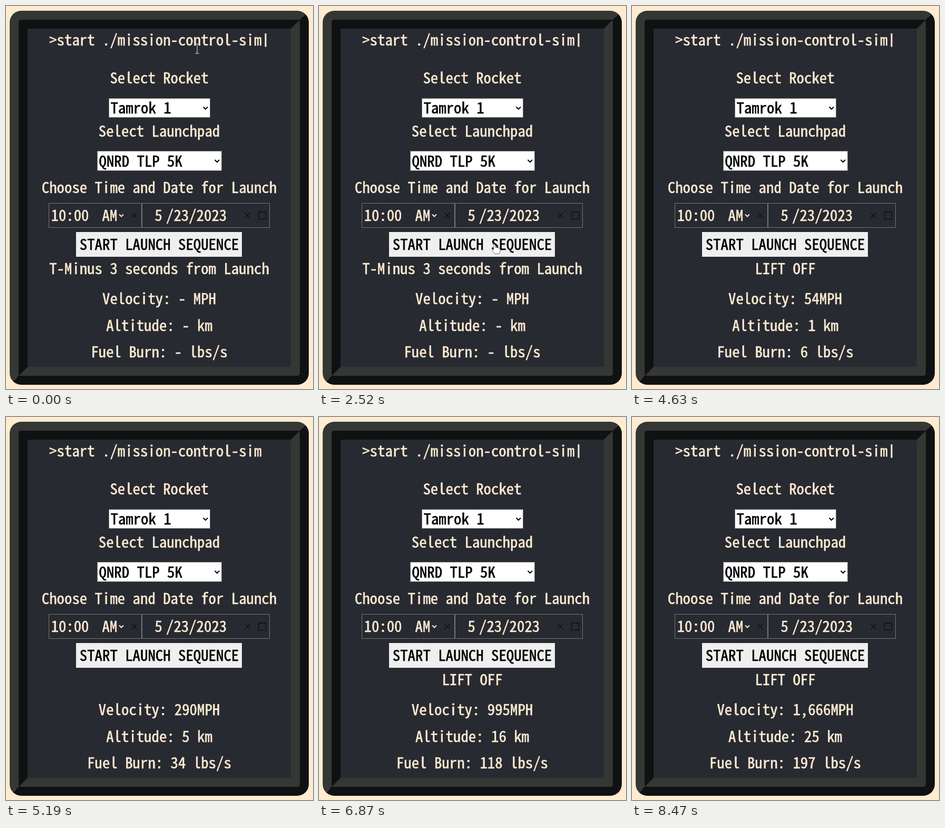
An HTML page that plays this animation: 583x727 px, repeating every 8.55 s.

```html
<!DOCTYPE html>
<html lang="en">
<head>
<meta charset="utf-8">
<title>Mission control</title>
<style>
  html, body { margin: 0; width: 100%; height: 100%; overflow: hidden; background: #feebd0; }
  .bezel, .bezel div { position: absolute; box-sizing: border-box; border: 17px solid; }
  .bezel {
    left: 7px; top: 9px; width: 568px; height: 710px; border-radius: 22px;
    border-color: #343733 #101112 #101112 #343733; background: #101112;
  }
  .bezel div {
    inset: 0; border-radius: 5px; background: #282a31;
    border-color: #101112 #343733 #343733 #101112;
  }
  svg { position: absolute; left: 0; top: 0; }
  text {
    font: 28.8px "Noto Sans Mono CJK JP", "Noto Sans Mono CJK SC", "Noto Sans Mono CJK KR", "Liberation Mono", monospace;
    fill: #fdebd2; stroke: #fdebd2; stroke-width: .6px; white-space: pre;
  }
  .mid { text-anchor: middle; }
  .ink { fill: #000; stroke: #000; }
  .field { fill: none; stroke: #767676; }
  .select { fill: #fff; }
  .line { fill: none; stroke: #000; stroke-width: 2; }
  .icon { fill: none; stroke: #111214; stroke-width: 1.6; }
</style>
</head>
<body>
<div class="bezel"><div></div></div>
<svg width="583" height="727" viewBox="0 0 583 727">
  <text id="title" x="82.2" y="75">&gt;start ./mission-control-sim</text>
  <rect id="caret" x="491.5" y="52" width="3" height="25.5" fill="#fdebd2"/>

  <text class="mid" x="291" y="147">Select Rocket</text>
  <rect class="field select" x="195.5" y="175.5" width="192" height="36"/>
  <text class="ink" x="198.5" y="204">Tamrok 1</text>
  <path class="line" d="M374.5 191.5l4.3 4.3 4.3-4.3"/>

  <text class="mid" x="291" y="248">Select Launchpad</text>
  <rect class="field select" x="173.5" y="275.5" width="236" height="37"/>
  <text class="ink" x="176.5" y="305">QNRD TLP 5K</text>
  <path class="line" d="M396.5 292l4.3 4.3 4.3-4.3"/>

  <text class="mid" x="291" y="355">Choose Time and Date for Launch</text>
  <rect class="field" x="81.5" y="374.5" width="176" height="46"/>
  <rect class="field" x="258.5" y="374.5" width="242" height="46"/>
  <text x="85.5" y="408">10:00</text>
  <text x="182.5" y="408">AM</text>
  <path class="line" style="stroke:#fdebd2" d="M215 395.5l4 4 4-4"/>
  <path class="icon" d="M238.5 392.5l10 10m0-10l-10 10M453.5 392.5l10 10m0-10l-10 10"/>
  <path class="icon" d="M479.5 391.5h14v13h-14zM482.5 389v2.5m8-2.5v2.5"/>
  <text x="282.5" y="408">5</text>
  <text x="304" y="408">/23/2023</text>

  <rect id="button" x="133" y="429" width="315" height="47" fill="#efefef"/>
  <text class="mid ink" x="291" y="463">START LAUNCH SEQUENCE</text>

  <text class="mid" id="status" x="291" y="509"></text>
  <text class="mid" id="velocity" x="291" y="566"></text>
  <text class="mid" id="altitude" x="291" y="617"></text>
  <text class="mid" id="fuel" x="291" y="667"></text>

  <g id="pointer">
    <path id="beam" d="M-3.5-9h2.5l1 1 1-1h2.5M0-8v16M-3.5 9h2.5l1-1 1 1h2.5" fill="none" stroke="#b4b5b7" stroke-width="1.4"/>
    <path id="arrow" d="M0 0v16l3.8-3.5 2.6 6 2.6-1.2-2.6-5.8h5z" fill="#fff" stroke="#000"/>
    <path id="hand" d="M-1.5 1.3Q0-1 1.5 1.3V6.5Q3.3 5.2 4.7 7Q6.7 5.8 7.8 7.6Q11 7 11 10V13Q11 16 9 18.5H0.5Q-1.5 15.5-5 11.5Q-4.3 8.7-1.5 11z" fill="#fff" stroke="#555" stroke-width=".8"/>
  </g>
</svg>
<script>
const LOOP = 8550, TICK = 80, LIFTOFF = 4550;
const $ = id => document.getElementById(id);
const show = (id, on) => $(id).style.visibility = on ? 'visible' : 'hidden';
const snap = (t, start) => start + Math.floor((t - start) / TICK) * TICK;
const selects = [...document.querySelectorAll('.select')];

// Keep the 14.4px terminal grid whichever monospace font is present.
const title = $('title');
const advance = title.getComputedTextLength() / title.textContent.length;
if (Math.abs(advance - 14.4) > .05)
  document.querySelector('svg').style.letterSpacing = 14.4 - advance + 'px';

// Rows hold a time followed by one or more values.
function track(rows, t) {
  const i = rows.findIndex(row => row[0] > t);
  if (i < 0) return rows[rows.length - 1].slice(1);
  if (i === 0) return rows[0].slice(1);
  const a = rows[i - 1], b = rows[i], k = (t - a[0]) / (b[0] - a[0]);
  return a.slice(1).map((v, j) => v + (b[j + 1] - v) * k);
}

const path = [
  [0, 363, 81], [240, 358, 150], [480, 350, 260], [720, 340, 375],
  [880, 335, 433], [1120, 329, 452], [2029, 329, 452], [2110, 333, 452],
  [2770, 333, 452], [3090, 400, 448], [3490, 590, 430]
];
const speed = [[4502, 0], [5190, 290.5], [6150, 695.5], [7670, 1328.5], [8470, 1666.5]];

function isLit(t) {
  if (t < 80) return true;
  return (t + 20) % 1000 >= 490;
}

function drawPointer(t) {
  const time = t < 1200 ? snap(t, 0) : t >= 2850 ? snap(t, 2850) : t;
  const [x, y] = track(path, time);
  const within = r => x > r.x.baseVal.value && y > r.y.baseVal.value &&
    x < r.x.baseVal.value + r.width.baseVal.value &&
    y < r.y.baseVal.value + r.height.baseVal.value;
  const onButton = within($('button'));
  const onText = y < 100 && x < 500;
  const visible = time < 3490;
  $('pointer').setAttribute('transform', `translate(${x} ${y})`);
  show('hand', visible && onButton);
  show('beam', visible && !onButton && onText);
  show('arrow', visible && !onButton && !onText);
  selects.forEach(s => s.style.stroke = within(s) ? '#4f4f4f' : '');
}

function drawReadings(t) {
  const flying = t >= LIFTOFF;
  const time = snap(t, 4470), s = (time - 4502) / 1000;
  const mph = flying ? Math.floor(track(speed, time)[0]).toLocaleString('en-US') : '- ';
  const km = flying ? Math.round(7 * s - .15 * s * s) : '-';
  const lbs = flying ? Math.round(49.65 * s) : '-';
  const count = t < 2600 ? 3 : t < 3570 ? 2 : 1;
  $('status').textContent = flying ? 'LIFT OFF' : `T-Minus ${count} seconds from Launch`;
  show('status', !flying || isLit(t));
  $('velocity').textContent = `Velocity: ${mph}MPH`;
  $('altitude').textContent = `Altitude: ${km} km`;
  $('fuel').textContent = `Fuel Burn: ${lbs} lbs/s`;
}

const origin = performance.now();
function frame() {
  const t = Math.max(0, performance.now() - origin) % LOOP;
  show('caret', isLit(t));
  $('button').style.fill = t >= 1450 && t < 1530 ? '#f5f5f5' : '';
  drawPointer(t);
  drawReadings(t);
  requestAnimationFrame(frame);
}
frame();
</script>
</body>
</html>
```
